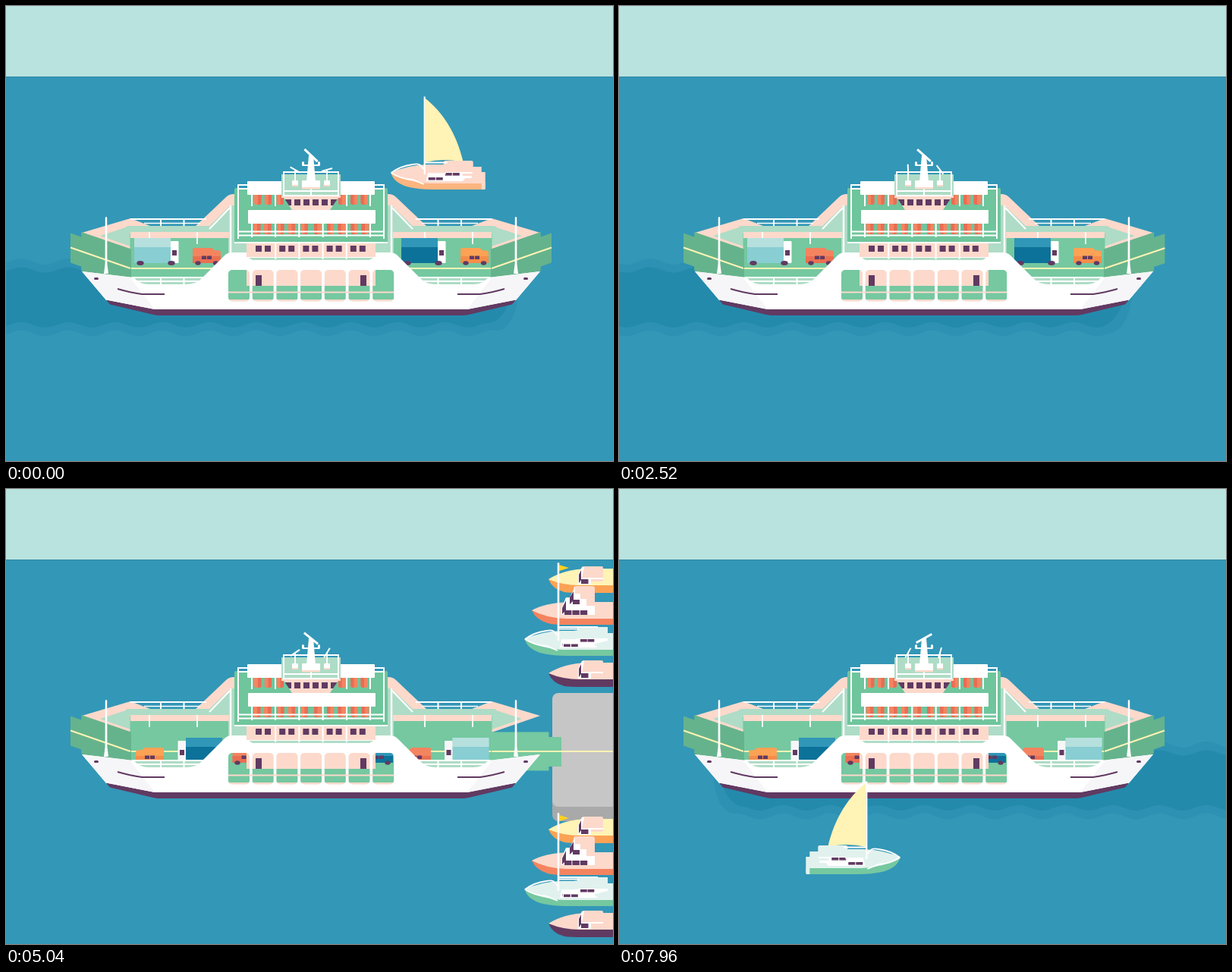
These frames come from a looping animation (800x600 px, 8 s). An HTML page with a canvas:

```html
<!DOCTYPE html>
<html lang="en">
<head>
<meta charset="utf-8">
<title>Ferry</title>
<style>
html, body { margin: 0; width: 100%; height: 100%; overflow: hidden; background: #3397b7; }
canvas { display: block; width: 100vw; height: 100vh; }
</style>
</head>
<body>
<canvas id="stage" width="800" height="600"></canvas>
<script>
const ctx = document.getElementById('stage').getContext('2d');
const LOOP = 8000;
const C = {
  sky: '#b9e3de', sea: '#3397b7', white: '#ffffff', shade: '#f6f6f8',
  green: '#75c8a0', wall: '#6fc59c', pale: '#aedcc6', pink: '#fcd9cb',
  plum: '#613a62', yellow: '#fff3b5', red: '#f4845f', redDark: '#e96d55',
  orange: '#fba255', mint: '#e1f2ee'
};
const VANS = {
  red: ['#f4845f', '#ea6f52'], orange: ['#fba255', '#f58d4a'], blue: ['#3097b8', '#0d7299']
};
const TRUCKS = { cyan: ['#b6e0de', '#88ced3'], blue: ['#3097b8', '#0d7299'] };

const clamp = v => Math.max(0, Math.min(1, v));
const span = (t, a, b) => clamp((t - a) / (b - a));
const inOut = u => u < 0.5 ? 2 * u * u : 1 - 2 * (1 - u) * (1 - u);

function box(x, y, w, h, color) {
  ctx.fillStyle = color;
  ctx.fillRect(x, y, w, h);
}
function round(x, y, w, h, r, color) {
  ctx.beginPath();
  ctx.roundRect(x, y, w, h, r);
  ctx.fillStyle = color;
  ctx.fill();
}
function poly(color, ...p) {
  ctx.beginPath();
  for (let i = 0; i < p.length; i += 2) ctx.lineTo(p[i], p[i + 1]);
  ctx.closePath();
  ctx.fillStyle = color;
  ctx.fill();
}
function line(color, width, ...p) {
  ctx.beginPath();
  for (let i = 0; i < p.length; i += 2) ctx.lineTo(p[i], p[i + 1]);
  ctx.strokeStyle = color;
  ctx.lineWidth = width;
  ctx.stroke();
}
function shape(color, d) {
  ctx.fillStyle = color;
  ctx.fill(new Path2D(d));
}
function trace(color, width, d) {
  ctx.strokeStyle = color;
  ctx.lineWidth = width;
  ctx.stroke(new Path2D(d));
}
function oval(x, y, rx, ry, color) {
  ctx.beginPath();
  ctx.ellipse(x, y, rx, ry, 0, 0, 7);
  ctx.fillStyle = color;
  ctx.fill();
}
function within(fn, dx, dy, sx = 1) {
  ctx.save();
  ctx.translate(dx, dy);
  ctx.scale(sx, 1);
  fn();
  ctx.restore();
}
// The ferry is symmetric about x = 402.
function both(fn) {
  fn();
  within(fn, 804, 0, -1);
}

/* Water */
function wakeLayer(color, front, top, bottom, amp, shift) {
  const wave = x => amp * Math.sin((x + shift) * Math.PI * 2 / 62);
  ctx.beginPath();
  for (let x = -10; x <= 200; x += 3) ctx.lineTo(x, top + wave(x));
  ctx.lineTo(front, top + 30);
  ctx.bezierCurveTo(front + 1, bottom - 24, front - 14, bottom, front - 32, bottom + wave(front - 32));
  for (let x = front - 34; x >= -10; x -= 3) ctx.lineTo(x, bottom + wave(x));
  ctx.closePath();
  ctx.fillStyle = color;
  ctx.fill();
}
function wake(t) {
  const right = t < 4000;
  const alpha = right ? 1 - span(t, 2540, 3020) : span(t, 5540, 5980);
  if (!alpha) return;
  const front = (right ? 675 : 681) + 1.5 * Math.sin(t / 330);
  const shift = t * 0.287 + 26;
  const draw = () => {
    wakeLayer('#2d91b3', front, 337, 431.5, 4, shift);
    wakeLayer('#248aac', front - 11, 348, 420.5, 3.5, shift);
  };
  ctx.globalAlpha = alpha;
  if (right) draw();
  else within(draw, 804, 0, -1);
  ctx.globalAlpha = 1;
}

/* Small boats */
function yacht(x, dy, dir, hull, keel, sail) {
  within(() => {
    ctx.translate(-552, 0);
    if (sail) shape(C.yellow, 'M553 122C575 139 594 167 603 206Q578 200 553 206Z');
    shape(keel, 'M508 221Q512 234 532 239Q546 242 562 242H632V232L540 228Z');
    shape(hull, 'M507 220Q528 210 556 209H577V206Q577 204 579 204H614Q616 204 616 206V212H627V219H632V240Q632 242 630 242H627V234H558Q530 233 507 220Z');
    shape(C.white, 'M556 222H578L579 219H615V221H602V224H614V227H606L602 231H554Z');
    [[557, 226], [567, 226], [579, 220], [589, 220]].forEach(w => box(w[0], w[1], 9, 3.6, C.plum));
    line(C.white, 2, 552, 206.5, sail ? 582 : 604, 206.5);
    line(C.white, 1.6, 556, 221, 580, 221);
    trace(C.white, 1.8, 'M508 220Q520 211 536 209Q545 207 547 211L551 215M508 220Q520 228 536 229L551 235');
    line(C.white, 2.2, 552, 119.5, 552, 222);
  }, x, dy, dir);
}
function motorboat(dy, hull, keel) {
  within(() => {
    shape(keel, 'M715 119Q720 132 736 136Q744 137 760 137H900V124Z');
    shape(hull, 'M715 119Q735 106 766 105H900V127H756Q734 127 715 119Z');
    round(759, 102, 28, 20, 2, C.pink);
    shape(C.white, 'M754 113L759 103H762L759 117H787V119H771V126H754Z');
    poly(C.plum, 755, 113, 758, 107, 758, 120, 755, 124);
    box(758, 119, 9.5, 6, C.plum);
  }, 0, dy);
}
function cruiser() {
  shape(C.red, 'M693 160Q698 172 714 177Q722 179 736 179H900V166Z');
  shape(C.pink, 'M693 160Q711 150 743 149H900V171H738Q712 170 693 160Z');
  round(748, 128, 28, 34, 3, C.pink);
  shape(C.white, 'M732 166V157L738 143H743L748 133L750 130V138H757V145H765V154H776V166Z');
  poly(C.plum, 733, 157, 738, 147, 738, 160, 733, 165);
  poly(C.plum, 743, 143, 748, 135, 748, 147, 743, 152);
  box(747, 146, 9, 6, C.plum);
  for (let i = 0; i < 3; i++) box(736 + i * 10.4, 160, 9.4, 6, C.plum);
}
function moorings() {
  motorboat(0, C.yellow, C.orange);
  cruiser();
  yacht(728, -22, 1, C.mint, C.green, false);
  poly(C.mint, 734, 189, 755, 186, 755, 182, 793, 182, 793, 190, 900, 190, 900, 212, 790, 212);
  box(800, 210, 100, 10, C.green);
  poly(C.white, 734, 201, 756, 197, 793, 197, 793, 200, 777, 204, 772, 209, 733, 209);
  [[735, 204.5], [745, 204.5], [757, 198], [766.5, 198]].forEach(w => box(w[0], w[1], 8.8, 3.6, C.plum));
  line(C.white, 2, 728, 182, 780, 182);
  line(C.white, 2.4, 728, 97.5, 728, 200);
  poly('#ffd21f', 729, 100, 742, 104, 729, 108);
  motorboat(124, C.pink, C.plum);
}
function harbour(t) {
  if (t < 2520 || t > 6300) return;
  const away = t < 4000 ? Math.max(0, 3106 - t) : Math.max(0, t - 5600);
  within(() => {
    round(720, 300, 300, 138, 8, '#a9a9a9');
    round(720, 269, 300, 150, 8, '#c6c6c6');
    line(C.yellow, 2, 724, 346, 1000, 346);
    moorings();
    within(moorings, 0, 330);
  }, 70 * (away / 440) ** 2, 0);
}

/* Vehicles: placed by left edge and wheel line, facing right by default */
function van(x, y, name, dir = 1) {
  const [body, low] = VANS[name];
  within(() => {
    shape(body, 'M0 -18Q0 -20 2 -20H25Q27 -20 28 -17L35 -16.500Q37 -16 37 -14V0H0Z');
    box(0, -9, 37, 9, low);
    box(12, -9.500, 6, 4.500, C.plum);
    box(19, -9.500, 6, 4.500, C.plum);
    oval(7, 0, 3.700, 2.700, C.plum);
    oval(30.500, 0, 3.700, 2.700, C.plum);
  }, dir > 0 ? x : x + 37, y, dir);
}
function truck(x, y, name, dir = 1) {
  const [top, body] = TRUCKS[name];
  within(() => {
    box(0, -33, 48, 33, body);
    box(0, -33, 48, 12, top);
    round(48, -29, 10.500, 29, 1, dir > 0 ? C.white : C.shade);
    box(50, -17, 6, 7, C.plum);
    oval(8, 0, 4.700, 3, C.plum);
    oval(49, 0, 4.700, 3, C.plum);
  }, dir > 0 ? x : x + 58, y, dir);
}
function vehicles(t) {
  const out = 660 * inOut(span(t, 3280, 4727));
  if (out < 660) {
    const y = 339;
    truck(169 + out, y, 'cyan');
    van(246 + out, y, 'red');
    van(297 + out, y, 'blue');
    truck(348 + out, y, 'blue');
    van(423.500 + out, y, 'orange');
    van(473 + out, y, 'red');
    truck(521 + out, y, 'blue');
    van(599 + out, y, 'orange');
  }
  const gap = 640 * (1 - inOut(span(t, 3160, 4584)));
  if (gap < 640) {
    const y = 361;
    van(171 + gap, y, 'orange', -1);
    truck(227 + gap, y, 'blue', -1);
    van(298.500 + gap, y, 'red', -1);
    truck(350 + gap, y, 'cyan', -1);
    van(422 + gap, y, 'orange', -1);
    van(473 + gap, y, 'blue', -1);
    van(523 + gap, y, 'red', -1);
    truck(578.500 + gap, y, 'cyan', -1);
  }
}

/* Ferry */
function ramp(up) {
  const tipX = 732 - 13 * up, tipY = 346 - 27.500 * up;
  const bx = 640 + (tipX - 640) * 0.82, by = 346 + (tipY - 346) * 0.82;
  const mix = (a, b) => Math.round(a + (b - a) * up);
  const color = `rgb(${mix(118, 101)},${mix(201, 179)},${mix(160, 140)})`;
  poly(color, 639, 320.500, bx, by - 25.500, bx, by - 19, tipX, tipY - 19,
    tipX, tipY + 20, bx, by + 20, bx, by + 25.500, 639, 371);
  line(C.yellow, 2, 640, 346, tipX, tipY);
}
function deckBack() {
  poly(C.pink, 100, 299, 164, 280, 164, 321);
  poly(C.pale, 164, 290, 124, 303, 164, 317);
  box(163.500, 300, 239, 68, C.green);
  box(290, 347, 112, 41, C.green);
  box(290, 387, 112, 3, C.pink);
  line(C.yellow, 2, 163, 346, 402, 346);
  box(164, 298, 130, 8, C.pink);
  line(C.white, 1.800, 189, 298, 189, 314);
  line(C.white, 1.800, 252, 298, 252, 314);
}
function upperDeck() {
  shape(C.pink, 'M164 280L190 290H250L290 252Q294 248 300 248H304V264L270 298H164Z');
  shape(C.pale, 'M160 290H268L296 263H304V326H293V298H150Z');
  line(C.white, 2, 164, 281, 264, 281);
  line(C.white, 1.500, 182, 286.500, 256, 286.500);
  line(C.white, 2, 204, 281, 204, 290);
  line(C.white, 2, 234.500, 281, 234.500, 290);
  line(C.white, 2.200, 268, 294, 295, 266);
  line(C.white, 2.500, 296, 263, 296, 326);
}
const hullEdge = 'M100 350L163 357.500H168Q176 367 188 367H238Q250 367 257 360L288 329Q292 325 298 325H506Q512 325 516 329L547 360Q554 367 566 367H616Q628 367 636 357.500H641L704 350L672 388L608 401H196L132 388Z';
function hull() {
  box(317, 348, 170, 21, C.pink);
  box(329, 355, 8, 14, C.plum);
  box(467, 355, 8, 14, C.plum);
  both(() => {
    box(166, 357, 98, 11, C.pale);
    line(C.white, 2, 166, 358, 264, 358);
    line(C.white, 1.800, 172, 363, 258, 363);
    line(C.white, 2, 204, 358, 204, 368);
    line(C.white, 2, 234.500, 358, 234.500, 368);
  });
  const body = new Path2D(hullEdge);
  for (let i = 0; i < 7; i++) body.roundRect(293 + 31.700 * i, 348, 28, 41.500, 5);
  ctx.fillStyle = C.white;
  ctx.fill(body, 'evenodd');
  line(C.pink, 2.200, 293, 377.500, 511, 377.500);
  poly(C.plum, 132, 387.500, 196, 400, 608, 400, 672, 387.500, 667, 393.500, 610, 407, 604, 408, 200, 408, 194, 407, 137, 393.500);
  both(() => {
    poly(C.shade, 100, 350, 163, 357.500, 196, 400, 132, 387.500);
    trace(C.plum, 2, 'M147 373Q164 378 179 380H209');
    round(116, 358, 6, 3, 1.500, C.plum);
    shape(C.white, 'M130.800 279Q132 277 133.200 279L133.400 340L135 353H129L130.600 340Z');
  });
}
function curtain(x, y, h) {
  ctx.save();
  ctx.beginPath();
  ctx.roundRect(x, y, 9.500, h, [0, 0, 3, 3]);
  ctx.clip();
  box(x, y, 10, h, C.red);
  box(x + 5, y, 5, h, C.redDark);
  ctx.restore();
}
function cabin() {
  box(303, 312, 198, 13, C.pale);
  box(317, 312, 170, 18, C.pink);
  poly(C.white, 317, 325, 317, 328, 487, 328, 487, 325, 487, 336, 317, 336);
  box(317, 328, 170, 3, C.pink);
  poly(C.pale, 320, 332, 484, 332, 479, 335, 325, 335);
  for (let i = 0; i < 5; i++) {
    box(329 + 31.200 * i, 316, 8, 8, C.plum);
    box(341 + 31.200 * i, 316, 8, 8, C.plum);
  }
  for (let i = 1; i < 5; i++) line(C.white, 2, 324 + 31.200 * i, 312, 324 + 31.200 * i, 334);
  round(301, 240, 202, 73, 2, C.wall);
  box(301, 311, 202, 2, C.white);
  both(() => {
    [327, 340.500, 356.500].forEach(x => curtain(x, 249, 13));
    [326, 340, 357, 371.500, 388.500].forEach(x => curtain(x, 287, 14));
    [324, 355].forEach(x => line(C.white, 2, x, 249, x, 264));
    [324, 355, 386.300].forEach(x => line(C.white, 2, x, 287, x, 305));
    line(C.white, 2, 318, 236, 306, 236, 306, 307);
    line(C.white, 2, 306, 241, 318, 241);
    line(C.white, 2, 306, 297.500, 402, 297.500);
    line(C.white, 2, 306, 302.500, 402, 302.500);
  });
  poly(C.pink, 363, 252, 441, 252, 428, 270, 376, 270);
  for (let i = 0; i < 6; i++) box(368 + 12 * i, 255, 8, 8, C.plum);
  poly(C.wall, 363, 252, 367, 254, 377, 269, 363, 269);
  poly(C.wall, 441, 252, 437, 254, 427, 269, 441, 269);
  both(() => curtain(356.500, 249, 13));
  round(318, 231, 168, 18, 1, C.white);
  round(319, 269, 168, 18, 1, C.white);
}
function spinner(x, y, half, width, degrees) {
  const a = degrees * Math.PI / 180, dx = half * Math.cos(a), dy = half * Math.sin(a);
  line(C.white, width, x - dx, y - dy, x + dx, y + dy);
}
function bridge(t) {
  box(363, 222, 78, 30, C.pale);
  box(363, 250.500, 78, 2.500, C.pink);
  ctx.strokeStyle = C.white;
  ctx.lineWidth = 2;
  ctx.strokeRect(366, 219, 72, 31);
  line(C.white, 1.800, 366, 244, 438, 244);
  line(C.white, 2, 402, 241, 402, 249);
  round(390, 230, 24, 11, 1, C.white);
  box(390, 239, 24, 2.500, C.pink);
  both(() => {
    round(377, 230, 8, 7, 1, C.white);
    box(377, 236, 8, 2, C.pink);
    line(C.white, 1.800, 381, 216, 381, 231);
    round(390, 205, 3, 6, 1.500, C.white);
  });
  line(C.white, 2, 391, 210, 413, 210);
  poly(C.white, 399, 197, 405, 197, 408, 232, 396, 232);
  spinner(402, 197, 11.800, 3, 43 + t * 0.2849);
  spinner(381, 216, 7.300, 2, 29 + t * 0.2374);
  spinner(423, 216, 7.300, 2, -16 + t * 0.2415);
}
function ferry(t) {
  both(deckBack);
  within(() => ramp(1), 804, 0, -1);
  ramp(t < 4000 ? 1 - inOut(span(t, 2440, 3106)) : inOut(span(t, 5300, 6340)));
  vehicles(t);
  both(upperDeck);
  both(() => box(164, 298, 130, 8, C.pink));
  both(() => [189, 252].forEach(x => line(C.white, 1.800, x, 298, x, 306)));
  hull();
  cabin();
  bridge(t);
}

function draw(t) {
  ctx.clearRect(0, 0, 800, 600);
  box(0, 0, 800, 600, C.sea);
  box(0, 0, 800, 93, C.sky);
  box(0, 93, 800, 1, '#2b89a6');
  wake(t);
  if (t < 2300) yacht(552 - t * 0.287, 0, 1, C.pink, '#fbb580', true);
  harbour(t);
  ferry(t);
  if (t > 6400) yacht(326 - (7960 - t) * 0.28, 266, -1, C.mint, C.green, true);
}
function tick() {
  draw(performance.now() % LOOP);
  requestAnimationFrame(tick);
}
tick();
</script>
</body>
</html>
```
